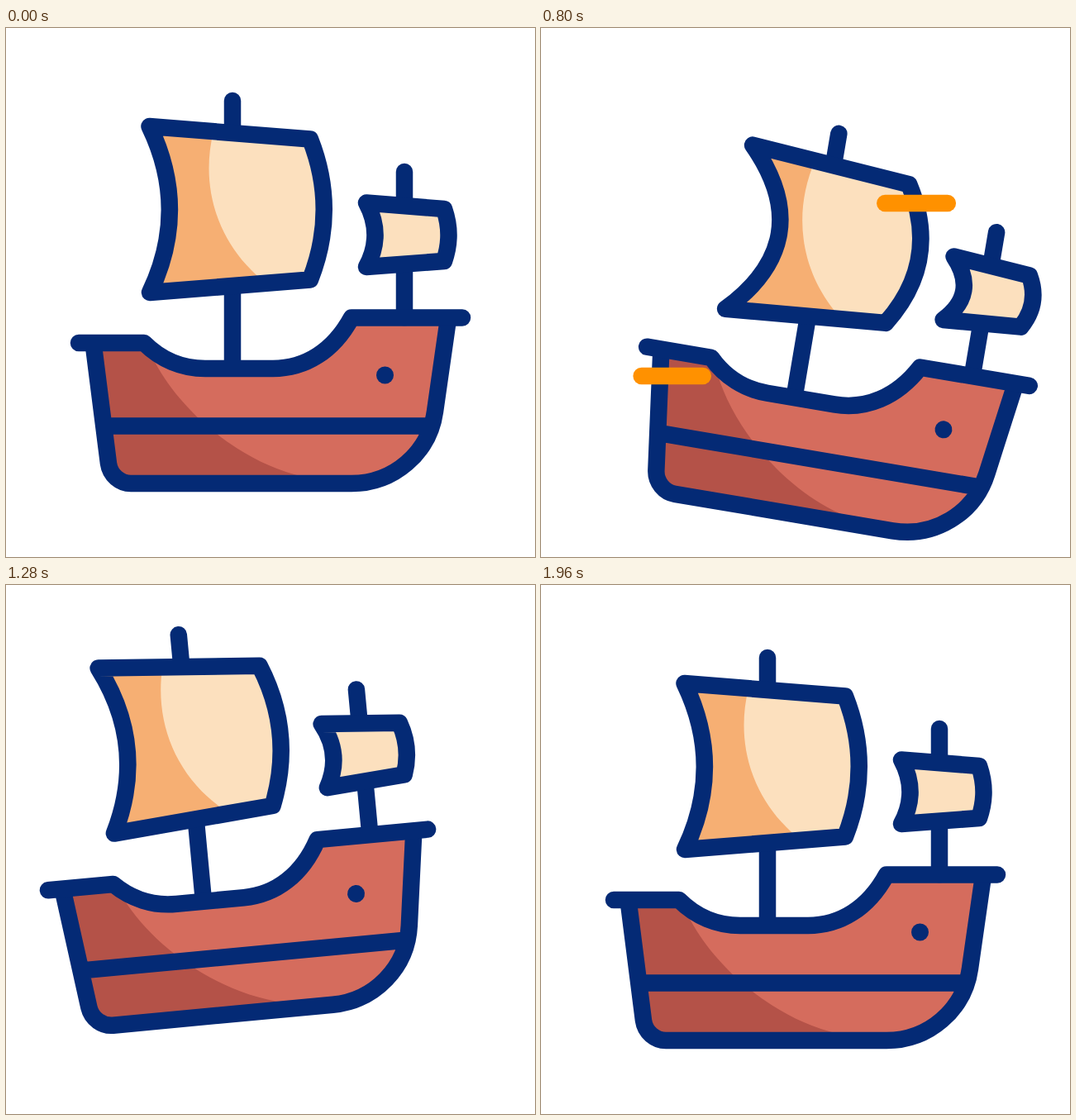
Animation of 640 by 640 pixels, one loop 2160 ms. Source, as an HTML page:

```html
<!DOCTYPE html>
<html lang="en">
<head>
<meta charset="utf-8">
<title>Sailing ship</title>
<style>
  html, body { margin: 0; width: 100%; height: 100%; overflow: hidden; background: #fff; }
  svg { display: block; width: 100%; height: 100%; }
  .line { fill: none; stroke: #042a75; stroke-width: 20.5; stroke-linecap: round; stroke-linejoin: round; }
  .cloth { fill: #fce0be; }
  .bar { stroke: #ff9100; stroke-width: 20.5; stroke-linecap: round; }
</style>
</head>
<body>
<svg viewBox="0 0 640 640">
  <g id="ship">
    <path fill="#d56c5d" d="M106 381H167C187 401 213 412 241 412H323C362 412 396 391 418 350H535L519 464C512 514 469 551 418 551H151C138 551 126 541 124 527Z"/>
    <path fill="#b45248" d="M106 381H167L178 400C208 460 280 525 360 543V551H151C138 551 126 541 124 527Z"/>
    <path class="line" d="M274 88V410M482 174V350"/>
    <path class="line" d="M106 385L124 527C126 541 138 551 151 551H418C469 551 512 514 519 464L535 352M125 481.5H515"/>
    <path class="line" d="M88 381H167C187 401 213 412 241 412H323C362 412 396 391 418 350.5H552"/>
    <circle cx="458.5" cy="420" r="10.5" fill="#042a75"/>
    <path class="cloth" id="mainCloth"/>
    <path fill="#f6af73" id="mainShade"/>
    <path class="line" id="mainEdge"/>
    <path class="cloth" id="smallCloth"/>
    <path class="line" id="smallEdge"/>
  </g>
  <line class="bar" id="upperBar" y1="212" y2="212"/>
  <line class="bar" id="lowerBar" y1="421" y2="421"/>
</svg>
<script>
const LOOP = 2160, STEP = 40;
const PIVOT = { x: 320, y: 365.5 };

// Each track lists [time in ms, value]; values ease between keys.
const tracks = {
  x: [[351, 0], [802, 39.5], [1262, -39.5], [1335, -39.5], [1920, 0]],
  y: [[310, 0], [715, 44.7], [767, 44.7], [1225, -33.3], [1290, -33.3], [1920, 0]],
  angle: [[374, 0], [811, 9.6], [1308, -5.5], [1920, 0]],
  wind: [[311, 0], [811, 1], [1350, 0]]
};

const bars = [
  { id: "upperBar", start: 372, lag: 75, length: 534 },
  { id: "lowerBar", start: 637, lag: 70, length: 495 }
];
const BAR_FROM = 79, BAR_TO = 539;

const el = id => document.getElementById(id);
const clamp = u => Math.min(1, Math.max(0, u));
const ease = u => u * u * (3 - 2 * u);

function valueAt(keys, t) {
  let value = keys[0][1];
  for (let i = 1; i < keys.length; i++) {
    const [t0, v0] = keys[i - 1], [t1, v1] = keys[i];
    if (t >= t0) value = v0 + (v1 - v0) * ease(clamp((t - t0) / (t1 - t0)));
  }
  return value;
}

function drawSails(wind) {
  const mainLeft = `Q${222 + 50 * wind} 219.5 173.5 119Z`;
  const main = `M173.5 119L368 134.5Q${401.5 + 20 * wind} 219.5 368 304.5L174 320${mainLeft}`;
  const small = `M436 211.5L530 219Q${541 + 7 * wind} 250.5 530 282L436 289Q${457 + 16 * wind} 250.5 436 211.5Z`;
  el("mainCloth").setAttribute("d", main);
  el("mainEdge").setAttribute("d", main);
  el("mainShade").setAttribute("d", `M173.5 119L251 125C235 190 254 258 309 304L174 320${mainLeft}`);
  el("smallCloth").setAttribute("d", small);
  el("smallEdge").setAttribute("d", small);
}

function drawBar({ id, start, lag, length }, t) {
  const place = begin => BAR_FROM + (BAR_TO - BAR_FROM) * ease(clamp((t - begin) / length));
  const head = place(start), tail = place(start + lag);
  const bar = el(id);
  bar.setAttribute("x1", tail);
  bar.setAttribute("x2", head);
  bar.style.display = head - tail < 3 ? "none" : "";
}

function draw() {
  const t = Math.floor(performance.now() % LOOP / STEP) * STEP;
  const x = PIVOT.x + valueAt(tracks.x, t);
  const y = PIVOT.y + valueAt(tracks.y, t);
  const angle = valueAt(tracks.angle, t);
  el("ship").setAttribute("transform",
    `translate(${x} ${y}) rotate(${angle}) translate(${-PIVOT.x} ${-PIVOT.y})`);
  drawSails(valueAt(tracks.wind, t));
  bars.forEach(bar => drawBar(bar, t));
  requestAnimationFrame(draw);
}
draw();
</script>
</body>
</html>
```
